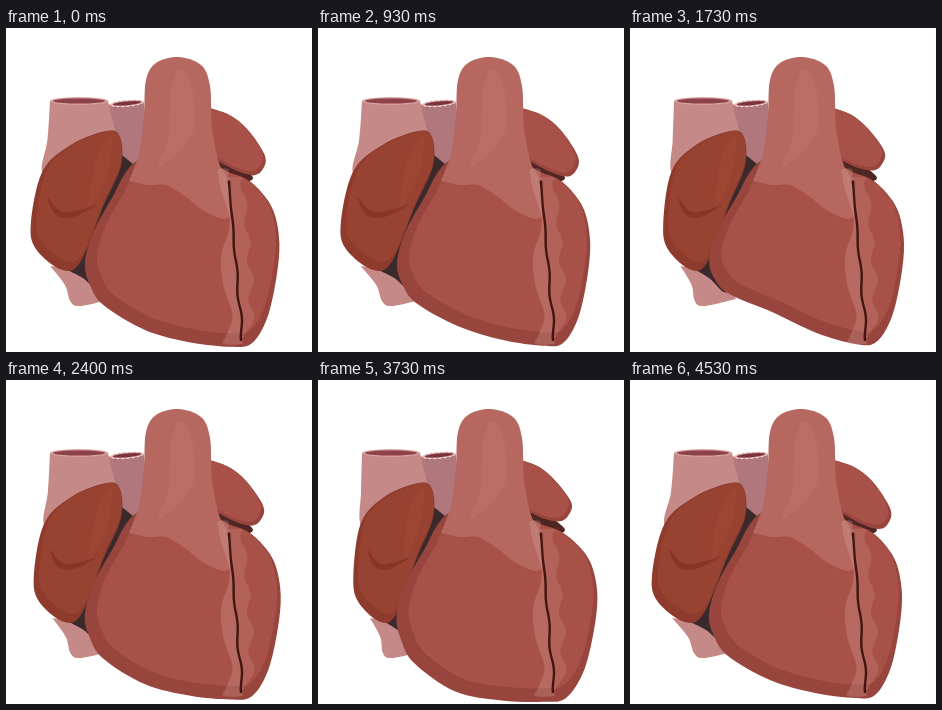
An HTML page for the animation above (4.67 s loop, 306 by 324 pixels).

```html
<!DOCTYPE html>
<html lang="en">
<head>
<meta charset="utf-8">
<title>Beating heart</title>
<style>
  html, body { margin: 0; width: 100%; height: 100%; overflow: hidden; background: #fff; }
  svg { display: block; width: 306px; height: 324px; }
</style>
</head>
<body>
<svg id="stage" viewBox="0 0 306 324"></svg>
<script>
const LOOP = 4670, FRAMES = 70, BEAT = LOOP / 4, PEAK = 0.4, EMPTY = 0.6;
const stage = document.getElementById('stage');
const shapes = [];
const pose = { atria: 0, full: 0, empty: 0 };

const clamp = v => Math.max(0, Math.min(1, v));
const ease = v => (1 - Math.cos(Math.PI * clamp(v))) / 2;
const wave = turns => Math.cos(2 * Math.PI * turns);

// Each warp displaces a resting point according to the current pose.
const still = (x, y) => [x, y];

function leftAtrium(x, y) {
  const pull = clamp((116 - x) / 94) ** 1.25 * clamp((y - 100) / 60) * clamp((278 - y) / 36);
  return [x + 15 * pose.atria * pull, y];
}

function rightAtrium(x, y) {
  const reach = clamp((x - 205) / 50);
  return [x - 8 * pose.atria * reach, y - 10 * pose.atria * reach * clamp((y - 95) / 45)];
}

function ventricle(x, y) {
  const { full, empty } = pose;
  const low = Math.exp(-((x - 135) ** 2 + (y - 300) ** 2) / 4050);
  return [
    x + (11 * full + 2 * empty) * clamp((x - 228) / 44) + low * (2 * empty - 4 * full),
    y + 4 * full * clamp((y - 230) / 85) + low * (14 * full - 16 * empty)
  ];
}

function add(tag, attrs) {
  const node = document.createElementNS('http://www.w3.org/2000/svg', tag);
  for (const key in attrs) node.setAttribute(key, attrs[key]);
  return stage.appendChild(node);
}

const parse = text => text.split(' ').map(p => p.split(',').map(Number));

function shape(fill, warp, points) {
  shapes.push({ node: add('path', { fill }), warp, points });
}

// A dark shape with a lighter copy shrunk towards one point, leaving a shaded rim.
function shaded(dark, light, warp, text, scale, cx, cy) {
  const points = parse(text);
  shape(dark, warp, points);
  shape(light, warp, points.map(([x, y]) => [cx + (x - cx) * scale, cy + (y - cy) * scale]));
}

// Closed curve through all points; a repeated point makes a corner.
function smooth(points) {
  const n = points.length, at = i => points[(i + n) % n];
  const fmt = (x, y) => x.toFixed(2) + ',' + y.toFixed(2) + ' ';
  let d = 'M' + fmt(...points[0]);
  for (let i = 0; i < n; i++) {
    const [a, b, c, e] = [at(i - 1), at(i), at(i + 1), at(i + 2)];
    if (b[0] === c[0] && b[1] === c[1]) continue;
    d += 'C' + fmt(b[0] + (c[0] - a[0]) / 6, b[1] + (c[1] - a[1]) / 6)
       + fmt(c[0] - (e[0] - b[0]) / 6, c[1] - (e[1] - b[1]) / 6) + fmt(...c);
  }
  return d + 'Z';
}

function rim(cx, cy, rx, ry, tilt, edge, inside) {
  const transform = `rotate(${tilt} ${cx} ${cy})`;
  add('ellipse', { cx, cy, rx, ry, transform, fill: edge });
  add('ellipse', { cx, cy, rx: rx - 3, ry: ry - 1.3, transform, fill: inside });
}

// Band down the front of the heart, reaching left and right of the crease.
function band(fill, from, to, left, right) {
  const crease = t => 222.3 + 14.5 * t + 1.6 * t * wave((t - 0.57) / 0.27);
  const edge = reach => Array.from({ length: 33 }, (_, i) => {
    const t = from + (to - from) * i / 32;
    return [crease(t) + reach(t), 146 + 170 * t];
  });
  shape(fill, still, [...edge(t => -left(t)), ...edge(right).reverse()]);
}

// Veins
shape('#b0787c', still, parse('98,77 104,77 104,77 138,74 138,74 138,115 129,138 112,130'));
rim(121, 75.3, 17, 3.2, -5, '#d3a09e', '#7d333b');
add('ellipse', { cx: 121, cy: 75.3, rx: 16.5, ry: 3, transform: 'rotate(-5 121 75.3)',
  fill: 'none', stroke: '#fff', 'stroke-width': 0.8, 'stroke-dasharray': '3 2' });
shape('#c58a87', leftAtrium, parse('44,73 44,73 102,73 102,73 108,98 118,130 118,130 85,165 45,165 34,143 41,112'));
rim(73, 73, 29, 3.9, 0, '#d6a29d', '#8e414a');
shape('#c58a87', leftAtrium, parse('42,238 42,238 58,257 64,273 74,278 106,271 106,271 88,245'));

// Gap and left atrium
shape('#3b2a2b', leftAtrium, parse('116,127 116,127 127,136 127,136 100,230 96,264 76,250 58,241 58,241 90,180'));
shaded('#8e3b2d', '#984231', leftAtrium,
  '101,103 114,109 115,138 97,178 74,233 55,242 28,222 22,196 35,143 66,116', 0.93, 106, 112);
shape('#9d4631', leftAtrium, parse('106,110 101,146 83,178 86,146 95,118'));
shape('#873626', leftAtrium, parse('40,170 56,184 91,177 91,177 66,189 48,187'));

// Right atrium
shape('#4f2622', still, parse('211,128 225,133 238,141 247,150 238,154 219,150'));
shaded('#98453e', '#a85148', rightAtrium,
  '200,79 200,79 224,87 243,102 260,128 259,142 248,149 222,139 200,120', 0.94, 212, 82);

// Ventricles
shaded('#98453e', '#a85148', ventricle,
  '129,134 106,170 87,205 79,235 84,256 98,276 140,300 185,313 225,318 245,315 ' +
  '260,290 269,250 272,215 267,185 256,166 240,151 215,140 180,110', 0.92, 230, 150);

// Aorta
shape('#b56760', still, parse('138,85 140,52 150,35 172,29 195,37 204,58 206,100 213,135 ' +
  '221,152 223,189 200,184 180,169 160,157 143,157 123,153 123,153 134,122'));
shape('#ba6d66', still, parse('174,41 186,60 188,100 172,124 152,139 163,108 165,60'));

// Light bands on both sides of the coronary crease
const none = () => 0, thin = () => 1.2;
band('#e8c4bc38', -0.03, 1, t => 5 + 11 * t + 5 * wave(t / 0.55), none);
band('#e8c4bc26', 0.02, 1, none, t => (14 + 3 * wave((t - 0.18) / 0.225)) * (1 - t ** 8));
band('#431612', 0.04, 0.98, thin, thin);

function setPose(frame) {
  const phase = ((frame * LOOP / FRAMES + 133.5) % BEAT) / BEAT;
  const squeeze = clamp((phase - PEAK) / (EMPTY - PEAK));
  const rising = phase < PEAK;
  pose.atria = rising ? ease(phase / PEAK) : 1 - ease((phase - PEAK) / (1 - PEAK));
  pose.full = rising ? (phase / PEAK) ** 1.65 : 1 - squeeze;
  pose.empty = squeeze * (1 - ease((phase - EMPTY) / (1 - EMPTY)));
}

function draw() {
  // The small lead absorbs step times rounded to 10 ms.
  const time = (performance.now() + 8) % LOOP;
  setPose(Math.floor(time / LOOP * FRAMES));
  for (const { node, warp, points } of shapes) {
    node.setAttribute('d', smooth(points.map(p => warp(...p))));
  }
  requestAnimationFrame(draw);
}
draw();
</script>
</body>
</html>
```
